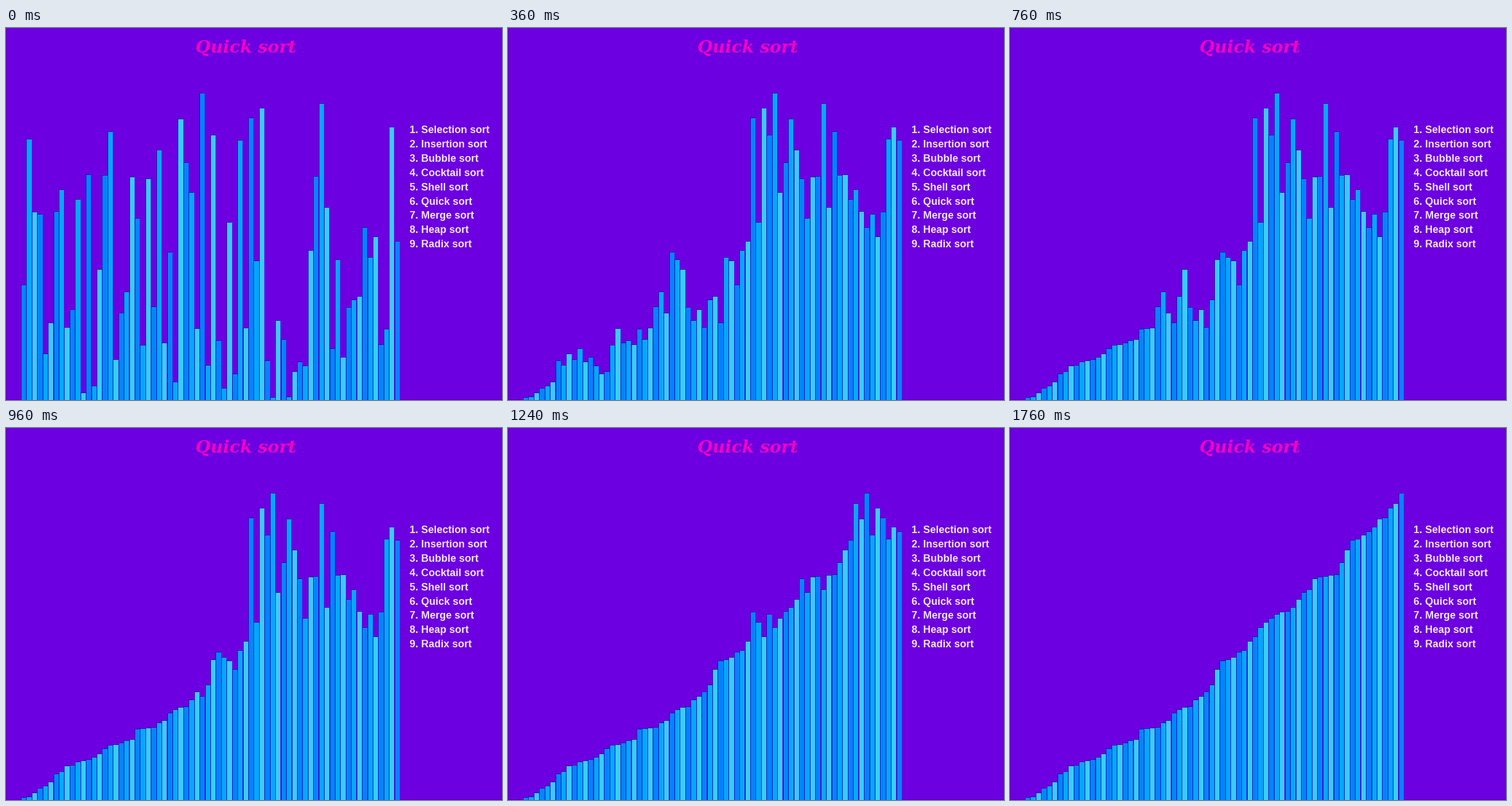
These frames come from a looping animation (864x648 px, 1800 ms). A matplotlib script:

```python
import matplotlib.pyplot as plt
from matplotlib.animation import FuncAnimation
from matplotlib.patches import Rectangle

W, H, DPI = 864, 648, 100
FRAMES, INTERVAL = 45, 40
LEFT, PITCH = 26, 9.43
CALLS_PER_FRAME, LEAD = 1.198, 3.17

BACK, EDGE = "#6c00e0", "#2c08a4"
FILLS = ["#0084ff", "#00a8ff", "#38ccff"]

# y of each bar's top edge before sorting
TOPS = [447, 193, 320, 324, 567, 513, 319, 281, 521, 490,
        298, 635, 255, 623, 420, 256, 180, 577, 496, 459,
        259, 331, 552, 262, 485, 212, 548, 390, 616, 158,
        234, 286, 523, 113, 587, 186, 544, 627, 338, 602,
        195, 522, 156, 405, 139, 579, 643, 509, 542, 642,
        598, 581, 588, 387, 258, 131, 312, 558, 403, 573,
        486, 473, 467, 347, 399, 363, 551, 524, 172, 371]

NAMES = ["Selection", "Insertion", "Bubble", "Cocktail", "Shell",
         "Quick", "Merge", "Heap", "Radix"]


def quick_sort(a, lo, hi, calls):
    """Sort in place; append the states reached by each partition call."""
    if lo >= hi:
        return
    states = []

    def swap(p, q):
        a[p], a[q] = a[q], a[p]
        states.append(a[:])

    i, j = lo, hi - 1
    while True:
        while a[i] < a[hi]:
            i += 1
        while j > lo and a[j] > a[hi]:
            j -= 1
        if i >= j:
            break
        swap(i, j)
    swap(i, hi)
    calls.append(states)
    quick_sort(a, lo, i - 1, calls)
    quick_sort(a, i + 1, hi, calls)


start = [H - top for top in TOPS]
calls = []
quick_sort(start[:], 0, len(start) - 1, calls)

# every call takes equally long, its swaps evenly spread within
timeline = [(c + (k + 1) / (len(states) + 1), state)
            for c, states in enumerate(calls)
            for k, state in enumerate(states)]


def heights_at(frame):
    now = frame * CALLS_PER_FRAME - LEAD
    current = start
    for time, state in timeline:
        if time > now:
            break
        current = state
    return current


fig = plt.figure(figsize=(W / DPI, H / DPI), dpi=DPI, facecolor=BACK)
ax = fig.add_axes([0, 0, 1, 1])
ax.set_xlim(0, W)
ax.set_ylim(0, H)
ax.axis("off")


def box(x, y, w, h, color):
    return ax.add_patch(Rectangle((x, y), w, h, fc=color, lw=0))


def label(x, y, text, px, color, font, **style):
    ax.text(x, H - y, text, fontsize=px * 72 / DPI, color=color,
            family=font, weight="bold", va="baseline", **style)


box(0, 0, 1, H, "#5200bc")
box(0, 0, W, 1, "#5200bc")

edges, fills = [], []
for n in range(len(start)):
    x = LEFT + n * PITCH
    edges.append(box(x, 0, PITCH - 0.3, 0, EDGE))
    fills.append(box(x + 1, 0, PITCH - 1.2, 0, FILLS[n % 3]))

label(329.5, 43, "Quick sort", 30, "#f500c4", "DejaVu Serif", style="italic")
for n, name in enumerate(NAMES):
    label(703, 183 + 24.9 * n, f"{n + 1}. {name} sort", 18, "#f3e6ff",
          "Liberation Sans")


def update(frame):
    for edge, fill, h in zip(edges, fills, heights_at(frame)):
        edge.set_height(h + 0.5)
        fill.set_height(h - 1)
    return edges + fills


anim = FuncAnimation(fig, update, frames=FRAMES, interval=INTERVAL,
                     repeat=True, repeat_delay=0, blit=False)
plt.show()
```
